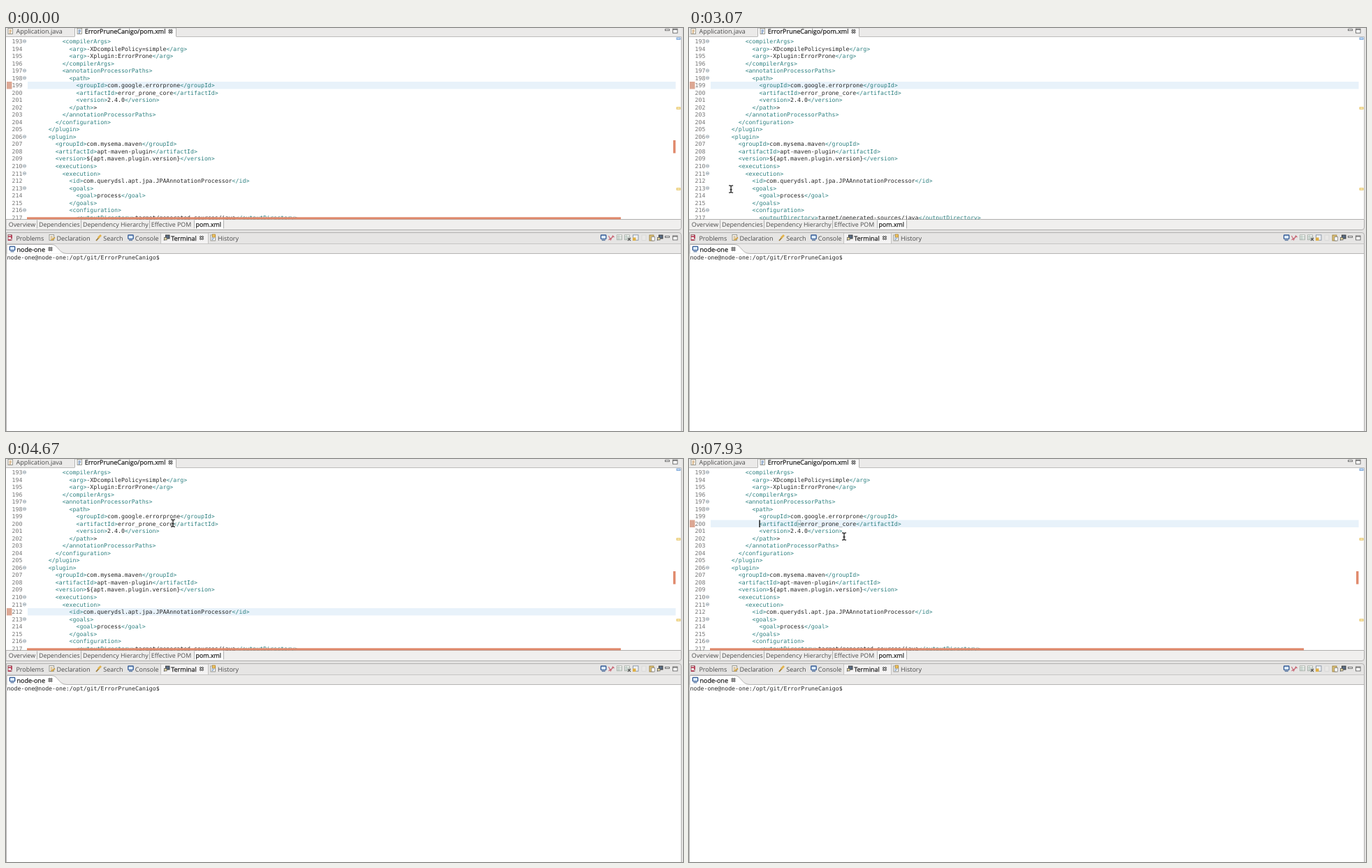
These frames come from a looping animation (969 px wide and 578 px high, 8000 ms). An HTML page:

```html
<!DOCTYPE html>
<html lang="en">
<head>
<meta charset="utf-8">
<title>Editor and terminal</title>
<style>
  html, body { margin: 0; width: 100%; height: 100%; overflow: hidden; background: #fff; }
  svg { display: block; width: 100vw; height: 100vh; }
  text { white-space: pre; text-rendering: geometricPrecision; }
  .ui { font: 9px "Open Sans", "Noto Sans", sans-serif; fill: #4a4a4a; }
  .page { font-size: 8.85px; }
  .active { fill: #1c1c1c; stroke: #1c1c1c; stroke-width: .25px; }
  .code { font: 8.244px "DejaVu Sans Mono", monospace; fill: #262626; }
  .tag { fill: #2e8080; }
  .num { fill: #777; }
</style>
</head>
<body>
<svg viewBox="0 0 969 578" preserveAspectRatio="none">
  <clipPath id="editorClip"><rect y="12" width="967" height="262.5"/></clipPath>
  <g id="chrome"></g>
  <g clip-path="url(#editorClip)">
    <rect id="line" x="31" width="927.5" height="10.5" fill="#e8f2fa"/>
    <rect id="range" x="1" width="7.5" height="10.5" fill="#dca793"/>
    <g id="code"></g>
    <rect id="match" width="4.6" height="9.6" fill="none" stroke="#a9b8b8" stroke-width=".8"/>
    <rect id="caret" width="1.4" height="10.5" fill="#111"/>
    <rect id="hbar" x="30" y="271.3" width="850" height="3.4" fill="#e08a6d"/>
    <rect id="vbar" x="955" y="161" width="3.4" height="18.5" fill="#e08a6d"/>
  </g>
  <g id="marks"></g>
  <g id="mouse" fill="none">
    <path d="M-3-5.2Q0-5.2 0-3.7Q0-5.2 3-5.2M0-4V4M-3 5.2Q0 5.2 0 3.7Q0 5.2 3 5.2" stroke="#fff" stroke-width="2.6" opacity=".75"/>
    <path d="M-3-5.2Q0-5.2 0-3.7Q0-5.2 3-5.2M0-4V4M-3 5.2Q0 5.2 0 3.7Q0 5.2 3 5.2M-1.6 .8H1.6" stroke="#1e1e1e" stroke-width="1.3"/>
  </g>
</svg>
<script>
const LOOP = 8000, TICK = 1000 / 15;
const FIRST = 193, ROW = 10.53, CHAR = 4.963, LEFT = 31;
const $ = id => document.getElementById(id);
const rowTop = n => 13.8 + (n - FIRST) * ROW;

function add(parent, name, attrs, content) {
  const el = document.createElementNS("http://www.w3.org/2000/svg", name);
  for (const key in attrs) el.setAttribute(key, attrs[key]);
  if (content) el.textContent = content;
  parent.append(el);
  return el;
}

const chrome = $("chrome"), marks = $("marks");
const rect = (x, y, width, height, fill, more, to = chrome) =>
  add(to, "rect", { x, y, width, height, fill, ...more });
const path = (d, stroke, width = 1, fill = "none", to = chrome) =>
  add(to, "path", { d, stroke, "stroke-width": width, fill });
const label = (x, y, text, cls = "") => add(chrome, "text", { x, y, class: "ui " + cls }, text);

function closeIcon(x, y) {
  const d = `M${x - 2.4} ${y - 2.4}l4.8 4.8m0-4.8l-4.8 4.8`;
  path(d, "#444", 2.7);
  path(d, "#f4f4f4", .9);
}
function windowButtons(y) {
  rect(943.5, y + .5, 6, 2, "#fff", { stroke: "#666", "stroke-width": .9 });
  rect(954.5, y, 6.5, 6, "#fff", { stroke: "#666", "stroke-width": .9 });
  path(`M954.5 ${y + 1}h6.5`, "#666", 1.2);
}
function screenIcon(x, y) {
  rect(x, y, 7.4, 5.6, "#dcebfb", { stroke: "#2f5793", "stroke-width": 1.3, rx: .8 });
  path(`M${x + 1.2} ${y + 7.5}h5`, "#54729c", 1.2);
}
function sheetIcon(x, y, color) {
  rect(x, y, 6.5, 8, "#fff", { stroke: "#8f8f85", "stroke-width": .9 });
  path(`M${x + 1.5} ${y + 2.5}h3.5m-3.5 2h3.5m-3.5 2h2.5`, color, .9);
}
function plugIcon(x, y) {
  path(`M${x} ${y + 7.5}l3-3`, "#777", 1.6);
  rect(x + 2.5, y, 5.5, 5, "#5b6e86", { stroke: "#333", "stroke-width": .9 });
  rect(x + .5, y + 3.6, 3.6, 3.4, "#e4d7a0", { stroke: "#555", "stroke-width": .7 });
}

// Editor frame and its two rows of tabs
rect(0, 0, 969, 578, "#e3e2e1");
rect(0, 0, 967, 12, "#ebeae9");
rect(0, 12, 967, 262.5, "#fff");
path("M98.5 12V0H243.5V12", "#b4b3b2", 1, "#fff");
path("M0 12.5H98.5M243.5 12.5H966.5V274", "#bdbcbb");
sheetIcon(3, .5, "#b77a28");
label(14.5, 8.3, "Application.java");
sheetIcon(102, .5, "#2d5f9e");
label(112.8, 8.3, "ErrorPruneCanigo/pom.xml", "active");
closeIcon(235.5, 4.8);
windowButtons(1.2);

path("M0 274.5H966.5V286Q966.5 289.5 963 289.5H0Z", "#b0afae", 1, "#f0efee");
rect(269.5, 275, 41.5, 13, "#fff");
for (const x of [44.5, 107.5, 205.5, 269.5, 311.5]) path(`M${x} 275.5V287.5`, "#aaa", .9);
[[3.8, "Overview"], [47, "Dependencies"], [110, "Dependency Hierarchy"], [207.8, "Effective POM"]]
  .forEach(([x, name]) => label(x, 284.5, name, "page"));
label(271.6, 284.5, "pom.xml", "page active");

// Views
path("M0 293.5H963Q966.5 293.5 966.5 297V578H.5V293.5", "#b3b2b1", 1, "#e6e5e4");
path("M221.5 309V294H289.5V309", "#c4c3c2", 1, "#f4f3f3");
path("M0 309.5H966.5", "#c6c5c4");
rect(3, 296.5, 5, 8, "#f3e7e7", { stroke: "#8d5a60", "stroke-width": .9 });
path("M3 299h4m1-2v5m-5 2h4", "#b32846", 1.5);
sheetIcon(62, 296.5, "#b48a3d");
path("M65 304.5l5-4", "#d0a242", 1.8);
path("M129 305l4-4.5", "#9a7a3a", 1.8);
path("M132 301l4-4", "#e2b34c", 2.8);
screenIcon(174.8, 297);
plugIcon(226, 297);
sheetIcon(293, 297, "#5a82b4");
rect(295.5, 296, 4, 4, "#efc35c", { stroke: "#a87d2a", "stroke-width": .7 });
[[14.4, "Problems"], [72.4, "Declaration"], [139.3, "Search"], [184.8, "Console"], [303, "History"]]
  .forEach(([x, name]) => label(x, 304.5, name));
label(236.2, 304.5, "Terminal", "active");
closeIcon(280, 301);

// View toolbar
screenIcon(851.5, 297);
path("M862.5 298l3 6 3-6 2 2M862.5 304l7-5", "#c96a78", 1.1);
for (const x of [874.5, 885.5]) {
  rect(x, 296.8, 7, 7, "#f5f7f4", { stroke: "#a2aaa2", "stroke-width": .8 });
  path(`M${x + 2.5} 297v7m-2.5-4.5h7m-7 2.5h7`, "#9bb0a6", .7);
}
path("M890 301l4 4m0-4l-4 4", "#555", 1.2);
rect(897.5, 296.8, 7.5, 7.5, "#eef1f6", { stroke: "#8793a3", "stroke-width": .9 });
rect(897, 300.5, 4.5, 4.5, "#dfb046");
rect(910, 297, 6, 7.5, "#e9e8e7", { stroke: "#d8d7d6", "stroke-width": .8 });
rect(921, 297, 6, 8, "#dfc276", { stroke: "#9a8141", "stroke-width": .9 });
rect(924, 299.5, 4.5, 5.5, "#fff", { stroke: "#777", "stroke-width": .7 });
plugIcon(932, 297);
windowButtons(298);

// Terminal
rect(1, 310, 965, 13.5, "#ebeae9");
path("M1 323.5V311Q1 310.5 3 310.5H65C75 310.5 75 323.5 87 323.5", "#b5b4b3", 1, "#fff");
path("M87 323.5H966", "#b5b4b3");
rect(1, 324, 965, 254, "#fff");
screenIcon(5.3, 313.3);
label(15.5, 320.8, "node-one", "active");
closeIcon(63.5, 317);
add(chrome, "text", { x: 1.6, y: 332, class: "code" }, "node-one@node-one:/opt/git/ErrorPruneCanigo$");

// Each entry: indent in characters, then markup
const lines = `10 <compilerArgs>
12 <arg>-XDcompilePolicy=simple</arg>
12 <arg>-Xplugin:ErrorProne</arg>
10 </compilerArgs>
10 <annotationProcessorPaths>
12 <path>
14 <groupId>com.google.errorprone</groupId>
14 <artifactId>error_prone_core</artifactId>
14 <version>2.4.0</version>
12 </path>>
10 </annotationProcessorPaths>
8 </configuration>
6 </plugin>
6 <plugin>
8 <groupId>com.mysema.maven</groupId>
8 <artifactId>apt-maven-plugin</artifactId>
8 <version>\${apt.maven.plugin.version}</version>
8 <executions>
10 <execution>
12 <id>com.querydsl.apt.jpa.JPAAnnotationProcessor</id>
12 <goals>
14 <goal>process</goal>
12 </goals>
12 <configuration>
14 <outputDirectory>target/generated-sources/java</outputDirectory>`.split("\n");
const folds = [193, 197, 198, 206, 210, 211, 213, 216];

lines.forEach((entry, i) => {
  const n = FIRST + i, y = rowTop(n) + 8.2;
  const [, indent, markup] = entry.match(/^(\d+) (.*)$/);
  add($("code"), "text", { x: 8.6, y, class: "code num" }, String(n));
  const line = add($("code"), "text", { x: LEFT + indent * CHAR, y, class: "code" });
  for (const part of markup.split(/(<[^>]*>)/).filter(Boolean))
    add(line, "tspan", part[0] === "<" ? { class: "tag" } : {}, part);
  if (folds.includes(n)) {
    add($("code"), "circle", { cx: 26.5, cy: y - 3, r: 2.2, fill: "#f6f8fa", stroke: "#93a1ab", "stroke-width": .8 });
    path(`M25.2 ${y - 3}h2.6`, "#5f7482", .8, "none", $("code"));
  }
});

// Overview marks
const mark = (y, fill, stroke) => rect(960, y, 5, 2.4, fill, { stroke, "stroke-width": .9 }, marks);
mark(14, "#cfe2f8", "#6a9bd3");
mark(113.8, "#fbeec0", "#e3bc55");
mark(229.8, "#fbeec0", "#e3bc55");

// Timelines: [time, ...values]
const mousePath = [
  [3070, 60, 231], [3600, 147, 221], [4000, 147, 221], [4330, 273, 70], [4530, 243, 88],
  [4670, 239, 92], [5130, 239, 92], [5200, 202, 93], [5330, 163, 94], [5400, 163, 94],
  [5470, 124, 93], [5600, 104, 90], [5730, 104, 90], [5800, 104, 89], [6000, 104, 89],
  [6200, 101, 91], [7400, 101, 91], [7730, 134, 99], [7800, 134, 99], [7870, 178, 105], [7930, 222, 111]
];
const hFade = [[0, 1], [470, 1], [1000, 0], [3330, 0], [3600, 1]];
const vFade = [[0, 1], [1200, 1], [1470, .15], [1670, .15], [1730, 0], [3330, 0], [3600, 1]];
const lineSteps = [[0, 199], [3870, 212], [4870, 200]];
const rangeSteps = [[0, 199], [4200, 212], [5530, 200]];
const caretSteps = [[0, 209.5], [3870, 146], [4870, 239.6], [6400, 100.4]];
const matchSteps = [[0, 0], [4870, 299.2], [6400, 155.2]];
const blinkSteps = [
  [0, 0], [130, 1], [530, 0], [1000, 1], [1400, 0], [3870, 1], [4270, 0], [4870, 1],
  [5270, 0], [5600, 1], [6070, 0], [6600, 1], [7000, 0], [7470, 1]
];

const stepAt = (table, t) => table.findLast(([start]) => start <= t)[1];
function valuesAt(table, t) {
  const i = table.findLastIndex(([start]) => start <= t);
  const [start, ...from] = table[Math.max(i, 0)];
  const next = table[i + 1];
  if (i < 0 || !next) return from;
  const k = (t - start) / (next[0] - start);
  return from.map((v, j) => v + (next[j + 1] - v) * k);
}
const set = (id, attrs) => { for (const key in attrs) $(id).setAttribute(key, attrs[key]); };

function draw(time) {
  const t = Math.floor((time + 4) / TICK) * TICK + 4;
  const top = rowTop(stepAt(lineSteps, t));
  const match = stepAt(matchSteps, t);
  const [x, y] = valuesAt(mousePath, t);
  set("line", { y: top });
  set("range", { y: rowTop(stepAt(rangeSteps, t)) });
  set("match", { x: match, y: top + .4, opacity: match ? 1 : 0 });
  set("caret", { x: stepAt(caretSteps, t), y: top, opacity: stepAt(blinkSteps, t) });
  set("hbar", { opacity: valuesAt(hFade, t)[0] });
  set("vbar", { opacity: valuesAt(vFade, t)[0] });
  set("mouse", { transform: `translate(${x} ${y})`, opacity: t >= mousePath[0][0] ? 1 : 0 });
}

const begin = performance.now();
function frame() {
  draw((performance.now() - begin) % LOOP);
  requestAnimationFrame(frame);
}
frame();
</script>
</body>
</html>
```
